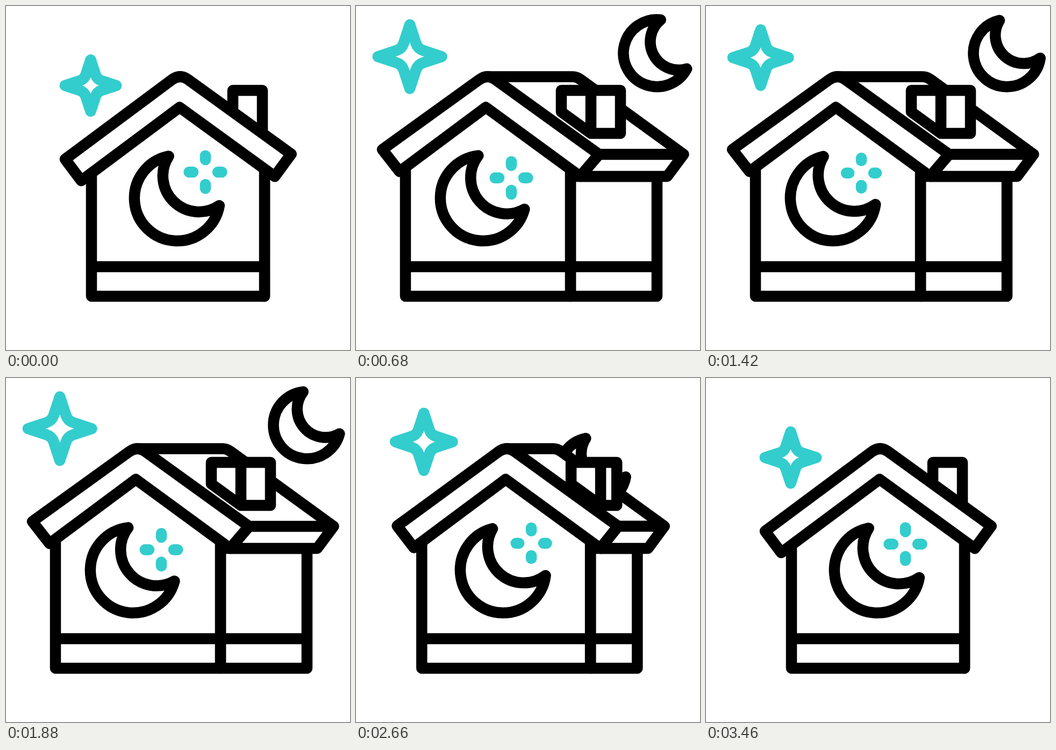
An HTML page that plays this animation: 640x640 px, repeating every 3.6 s.

```html
<!DOCTYPE html>
<html lang="en">
<head>
<meta charset="utf-8">
<title>Night house</title>
<style>
  html, body { margin: 0; width: 100%; height: 100%; overflow: hidden; background: #fff; }
  svg { display: block; width: 100vw; height: 100vh; }
  path { fill: #fff; stroke: #000; stroke-width: 20.5; stroke-linecap: round; stroke-linejoin: round; }
  .teal { stroke: #33cdcd; }
</style>
</head>
<body>
<svg viewBox="0 0 640 640">
  <path id="skyMoon"/>
  <path id="sideWall"/>
  <path id="sideRoof"/>
  <path id="chimney"/>
  <path id="frontWall"/>
  <path id="frontRoof"/>
  <path id="wallMoon"/>
  <path id="cross" class="teal"/>
  <path id="star" class="teal"/>
</svg>
<script>
const LOOP = 3600;
const TIMES = [0, 600, 1190, 1790, 2380, 2980, 3480];
const TRACKS = {
  turn: [0, 1, 1, 1, 1, 0, 0],
  pulse: [0, 1, 0, 1, 0, 1, 0],
  tilt: [0, 5.5, -5, 5.5, -5, 0, 0],
  skyTilt: [-43, 19, -5, 5.5, -5, 5.5, 5.5],
  lift: [0, 11.5, -2.9, 11.5, -2.9, 0, 0],
  reach: [30.5, 30.5, 26.7, 30.5, 26.7, 30.5, 30.5]
};

const el = id => document.getElementById(id);
const put = (id, d) => el(id).setAttribute('d', d);
const mix = (a, b, k) => a + (b - a) * k;
const ease = s => s * s * (3 - 2 * s);

function track(name, t) {
  const v = TRACKS[name];
  let i = 0;
  while (i < TIMES.length - 1 && t >= TIMES[i + 1]) i++;
  if (i === TIMES.length - 1) return v[i];
  return mix(v[i], v[i + 1], ease((t - TIMES[i]) / (TIMES[i + 1] - TIMES[i])));
}

// Crescent centred on its outer circle
function moon(cx, cy, r, tilt) {
  const tip = deg => {
    const a = (deg + tilt) * Math.PI / 180;
    return `${cx + r * Math.cos(a)},${cy + r * Math.sin(a)}`;
  };
  const a = tip(-101.5), b = tip(10), inner = r * 0.843;
  return `M${a}A${inner},${inner} 0 0 0 ${b}A${r},${r} 0 1 1 ${a}Z`;
}

function star(cx, cy, r) {
  let d = '';
  for (let i = 0; i < 4; i++) {
    const a = i * Math.PI / 2, c = Math.cos(a), s = Math.sin(a);
    const pt = (x, y) => `${cx + r * (x * c - y * s)},${cy + r * (x * s + y * c)}`;
    d += `${i ? 'L' : 'M'}${pt(0, -1)}L${pt(0.191, -0.42)}Q${pt(0.248, -0.248)} ${pt(0.42, -0.191)}`;
  }
  return d + 'Z';
}

function cross(cx, cy, from, to) {
  return [[1, 0], [0, 1], [-1, 0], [0, -1]].map(([x, y]) =>
    `M${cx + x * from},${cy + y * from}L${cx + x * to},${cy + y * to}`).join('');
}

function house(p) {
  const at = (a, b) => mix(a, b, p);
  const left = at(159, 92), mid = at(481, 399), far = at(479, 560);
  const peak = at(323.5, 244), farPeak = at(323.5, 403);
  const eave = `${at(530.5, 452)},${at(275.5, 276)}`;
  const foot = `${at(500, 417)},317`;
  const farEave = `${at(530.5, 609.5)},${at(275.5, 276)}`;
  const farFoot = `${at(500, 579)},317`;

  put('sideWall', `M${mid},317V540H${far}V317ZM${mid},485H${far}`);
  put('sideRoof', `M${peak},131.5H${farPeak}Q${farPeak + 7.5},131.5 ${farPeak + 15},136.8` +
    `L${farEave}L${farFoot}L${foot}L${eave}ZM${eave}L${farEave}`);

  const c0 = at(422, 382), c1 = at(477, 437), c2 = at(477, 492);
  put('chimney', `M${c0},157H${c2}V237H${c1}L${c0},197ZM${c1},157V237`);

  // The gable edge stays tucked under the roof band
  put('frontWall', `M${left},290L${peak},176L${mid},290V540H${left}ZM${left},485H${mid}`);
  put('frontRoof', `M${at(110, 49)},${at(285, 267)}L${peak - 15},137.3Q${peak},126 ${peak + 15},136.8` +
    `L${eave}L${foot}L${at(323, 241.5)},188.5L${at(140, 81)},${at(325, 308)}Z`);
}

function draw(t) {
  const p = track('turn', t), k = track('pulse', t), shift = 82 * p;
  house(p);
  put('skyMoon', moon(mix(295, 560, p), mix(277, 87.7, p), 62.5, track('skyTilt', t)));
  put('wallMoon', moon(318.5 - shift, 357.4, 79.6, track('tilt', t)));
  put('cross', cross(371 - shift, 309 + track('lift', t), 23, track('reach', t)));
  put('star', star(157.5 - 55 * p - 2.5 * k, 148 - 51 * p - 3 * k, mix(47.7, 60, k)));
}

function tick() {
  draw(performance.now() % LOOP);
  requestAnimationFrame(tick);
}
tick();
</script>
</body>
</html>
```
